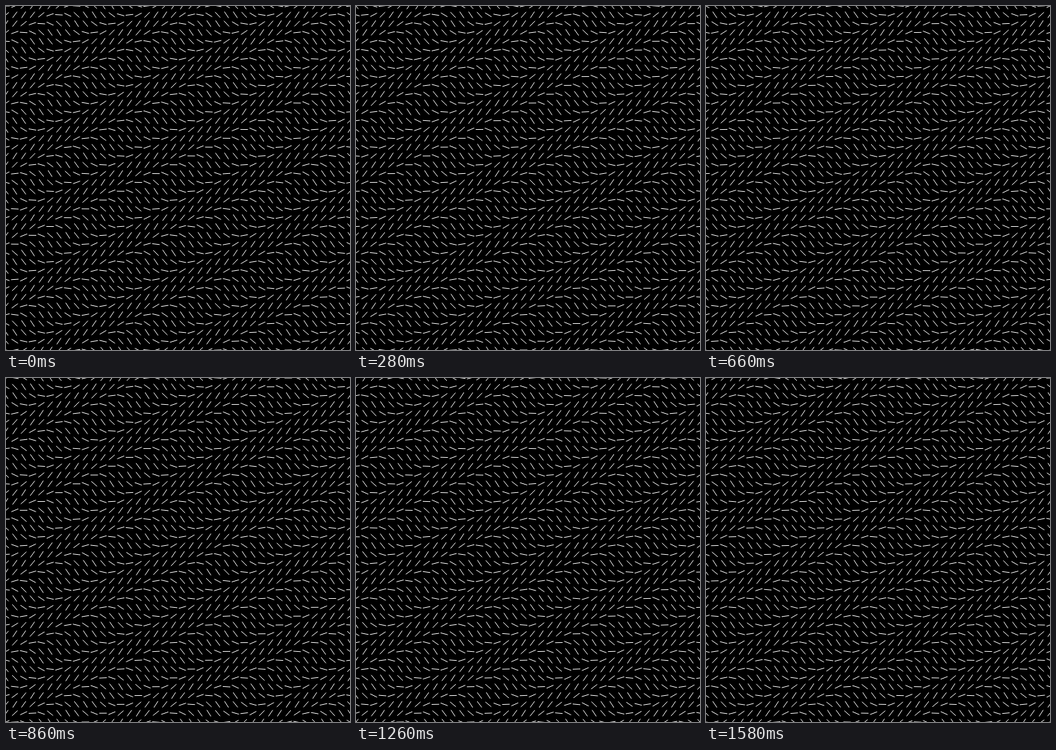
Write an HTML page with a canvas that moves like this. It is 500 px wide and 500 px high and loops after 1600 ms.

```html
<!DOCTYPE html>
<html lang="en">
<head>
<meta charset="utf-8">
<title>Dash field</title>
<style>
  html, body { margin: 0; width: 100%; height: 100%; overflow: hidden; background: #000; }
  canvas { display: block; width: 500px; height: 500px; }
</style>
</head>
<body>
<canvas id="stage" width="500" height="500"></canvas>
<script>
const SIZE = 500;
const CELLS = 39;
const STEP = SIZE / CELLS;
const HALF_DASH = 5.5;
const SWING = 1;          // largest tilt, in radians
const WAVE = 0.4;         // phase per column; each row counts double
const LOOP_MS = 1600;
const TICK_MS = 20;

const ctx = document.getElementById("stage").getContext("2d");

function addDash(x, y, angle) {
  const dx = HALF_DASH * Math.cos(angle);
  const dy = HALF_DASH * Math.sin(angle);
  ctx.moveTo(x - dx, y - dy);
  ctx.lineTo(x + dx, y + dy);
}

function draw(ms) {
  const phase = 2 * Math.PI * ms / LOOP_MS;
  ctx.fillStyle = "#000";
  ctx.fillRect(0, 0, SIZE, SIZE);
  ctx.strokeStyle = "#fff";
  ctx.lineWidth = 1;
  ctx.beginPath();
  for (let row = 0; row <= CELLS; row++) {
    for (let col = 0; col <= CELLS; col++) {
      const tilt = -SWING * Math.sin(WAVE * (col + 2 * row) - phase);
      addDash(col * STEP, row * STEP, tilt);
    }
  }
  ctx.stroke();
}

const start = performance.now();

function frame() {
  const elapsed = (performance.now() - start) % LOOP_MS;
  draw(Math.floor(elapsed / TICK_MS) * TICK_MS);
  requestAnimationFrame(frame);
}

frame();
</script>
</body>
</html>
```
